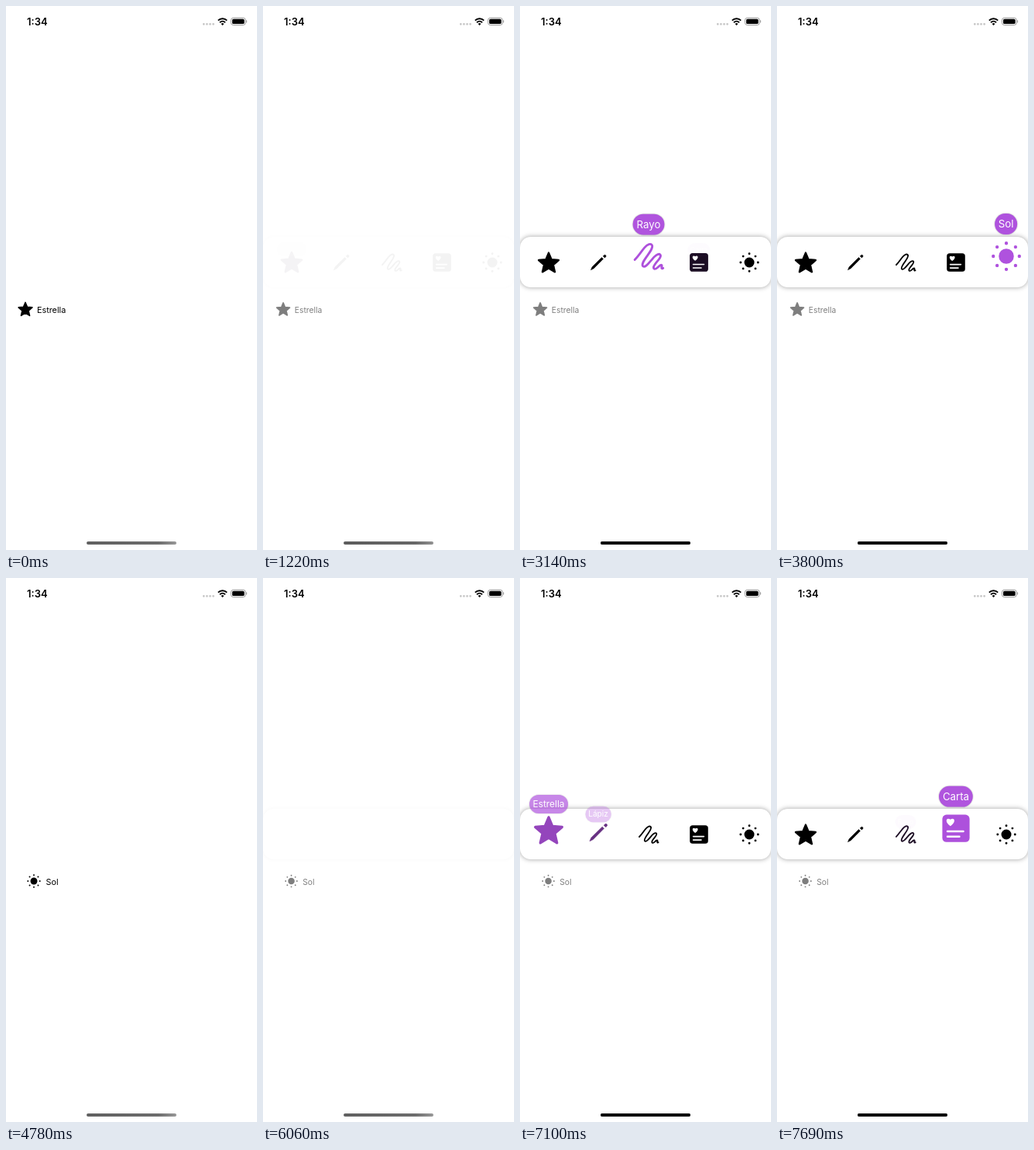
An HTML page that plays this animation: 324 by 700 pixels, repeating every 8000 ms.

```html
<!DOCTYPE html>
<html lang="es">
<head>
<meta charset="utf-8">
<title>Icon picker</title>
<style>
  html, body { margin: 0; width: 100%; height: 100%; overflow: hidden; background: #fff; }
  body { font-family: Inter, "Liberation Sans", sans-serif; color: #000; }
  #stage { position: relative; width: 324px; height: 700px; overflow: hidden; background: #fff; }
  #stage > * { position: absolute; }
  svg { display: block; overflow: visible; }
  #status { left: 0; top: 0; }
  .home { left: 104px; top: 688.7px; width: 116px; height: 4.3px; border-radius: 3px; }
  #homeGray { background: linear-gradient(90deg, #606060, #6c6c6c 80%, #989898); }
  #homeBlack { background: #000; }
  .label { top: 379px; height: 22px; display: flex; align-items: center; font-size: 10.8px; white-space: nowrap; }
  .label svg { width: 22px; height: 22px; margin-right: 4.5px; }
  .label span { position: relative; top: 1.5px; }
  #bar { left: 0; top: 0; width: 324px; height: 700px; }
  #panel { position: absolute; left: 0; top: 297px; width: 324px; height: 65px; border-radius: 14px;
    background: #fff; box-shadow: 0 0 6px rgba(0, 0, 0, .38); }
  .icon { position: absolute; top: 314px; width: 32px; height: 32px; margin-left: -16px; }
  .pill { position: absolute; top: 266.5px; height: 27px; line-height: 27px; padding: 0 5px; border-radius: 14px;
    background: #af52de; color: #fff; font-size: 13.3px; white-space: nowrap; box-shadow: 0 0 2px rgba(0, 0, 0, .35); }
</style>
</head>
<body>
<svg width="0" height="0" style="position:absolute">
  <symbol id="star" viewBox="-16 -16 32 32" overflow="visible">
    <path d="M0-12.4 3.6-3.8 12.9-3 5.9 3.1 8 12.2 0 7.4-8 12.2-5.9 3.1-12.9-3-3.6-3.8Z"
      fill="currentColor" stroke="currentColor" stroke-width="2.4" stroke-linejoin="round"/>
  </symbol>
  <symbol id="pencil" viewBox="-16 -16 32 32" overflow="visible">
    <path d="M-9.5 9.6-7.9 5.8 4.5-6.4 6.4-4.5-5.8 7.8ZM6.3-8.1 7.4-9.2Q8.6-10.2 9.6-9.2 10.5-8.2 9.6-7.1L8.4-6Z"
      fill="currentColor" stroke="currentColor" stroke-width=".6" stroke-linejoin="round"/>
  </symbol>
  <symbol id="scribble" viewBox="-16 -16 32 32" overflow="visible">
    <path d="M-12 3C-9 0-6.5-4-3.5-7.5-1-10.5 2-11.5 3-9.5 4-7.5 1-3.5-1.5 0-4 3.5-6.5 7-4.8 8.6-3 10 0 6 2.8 2.8 5 0 8.5-3 10-1.5 11.5 0 8.5 3 6.5 5.5 4.5 8 3.5 10 5 10.8 6.8 11.5 8.5 8.5 10.2 7.6 12 7 11.5 8.5 11.2 9.5 11 10.8 12 10.8 12.6 10.2"
      fill="none" stroke="currentColor" stroke-width="1.9" stroke-linecap="round"/>
  </symbol>
  <symbol id="card" viewBox="-16 -16 32 32" overflow="visible">
    <rect x="-11.8" y="-11.8" width="23.6" height="23.6" rx="3.6" fill="currentColor"/>
    <path d="M-4.8-2C-10.5-5.8-8-10-4.8-7.6-1.6-10 .9-5.8-4.8-2Z" fill="#fff"/>
    <path d="M-7.4 2.6H6.4M-7.4 7.1H3" stroke="#fff" stroke-width="1.6" stroke-linecap="round"/>
  </symbol>
  <symbol id="sun" viewBox="-16 -16 32 32" overflow="visible">
    <circle r="6.5" fill="currentColor"/>
    <circle r="11.2" fill="none" stroke="currentColor" stroke-width="2.9" stroke-linecap="round"
      pathLength="8" stroke-dasharray="0 1"/>
  </symbol>
</svg>

<div id="stage">
  <svg id="status" width="324" height="40">
    <text x="27" y="24.9" font-size="13" font-weight="600">1:34</text>
    <path d="M255.3 23.3h13.5" stroke="#c6c6c6" stroke-width="2.8" stroke-linecap="round" stroke-dasharray="0 4.1"/>
    <g fill="none" stroke="#000" stroke-width="2">
      <path d="M273.8 18.6a8.2 8.2 0 0 1 11.4 0"/>
      <path d="M276 21.2a5 5 0 0 1 7 0"/>
    </g>
    <path d="M279.5 25 277.6 23a2.7 2.7 0 0 1 3.8 0Z"/>
    <rect x="290.5" y="15.3" width="18.6" height="9.2" rx="2.8" fill="none" stroke="#999"/>
    <rect x="292" y="16.8" width="15.6" height="6.2" rx="1.6"/>
    <path d="M310.2 18.3q1.4 1.6 0 3.2Z" fill="#999" stroke="#999" stroke-width=".5"/>
  </svg>
  <div class="label" id="before" style="left:13.5px;transform-origin:33.5px 11.5px">
    <svg><use href="#star"/></svg><span>Estrella</span>
  </div>
  <div class="label" id="after" style="left:25px;transform-origin:22px 11.5px">
    <svg><use href="#sun"/></svg><span>Sol</span>
  </div>
  <div id="bar"><div id="panel"></div></div>
  <div class="home" id="homeGray"></div>
  <div class="home" id="homeBlack"></div>
</div>

<script>
const LOOP = 8000;
const $ = id => document.getElementById(id);
const names = [['star', 'Estrella'], ['pencil', 'Lápiz'], ['scribble', 'Rayo'], ['card', 'Carta'], ['sun', 'Sol']];

// [time, selected item], -1 for none
const picks = [[1200, 0], [1908, 1], [2548, 2], [3128, 3], [3628, 4], [5000, -1],
               [6550, 0], [7038, 1], [7285, 2], [7535, 3]];

const ease = x => {
  x = Math.min(1, Math.max(0, x));
  return x * x * (3 - 2 * x);
};
const ramp = (t, start, dur = 170) => ease((t - start) / dur);

// Springy entrance that overshoots to about 1.2
const pop = u => u <= 0 ? 0 : 1 - Math.exp(-.0107 * u) * Math.cos(.02094 * u);

// Purple blended from black in linear light
const tint = p => {
  const k = p ** (1 / 2.2);
  return `rgb(${175 * k}, ${82 * k}, ${222 * k})`;
};

const items = names.map(([id, title], i) => {
  const x = 36.5 + 64.75 * i;
  $('bar').insertAdjacentHTML('beforeend',
    `<svg class="icon" style="left:${x}px"><use href="#${id}"/></svg>`);
  return { icon: $('bar').lastElementChild, title, x };
});
for (const it of items) {
  $('bar').insertAdjacentHTML('beforeend', `<div class="pill" style="left:${it.x}px">${it.title}</div>`);
  it.pill = $('bar').lastElementChild;
}

function selection(i, t) {
  let p = 0, prev = -1;
  for (const [start, pick] of picks) {
    if (pick === i) p += ramp(t, start);
    if (prev === i) p -= ramp(t, start);
    prev = pick;
  }
  return Math.max(0, p);
}

function setLabel(el, press, show) {
  el.style.opacity = show * (1 - .5 * press);
  el.style.transform = `scale(${1 - .05 * press})`;
}

function draw(now) {
  const t = now % LOOP;
  const close = ramp(t, 4550, 220);

  setLabel($('before'), ramp(t, 25, 80) - close, 1 - close);
  setLabel($('after'), 1 - close + ramp(t, 5725, 80), close);
  $('bar').style.opacity = ramp(t, 1200) - close + ramp(t, 6030);
  $('homeBlack').style.opacity = ramp(t, 1200) - close + ramp(t, 6490);

  items.forEach(({ icon, pill }, i) => {
    const p = selection(i, t);
    const entry = t < 5000 ? 1 : pop(t - 6080 - 60 * i);
    icon.style.transform = `translateY(${-8 * p}px) scale(${(1 + .5 * p) * entry})`;
    icon.style.color = tint(p);
    pill.style.opacity = p;
    pill.style.transform = `translate(-50%, ${34 * (1 - p)}px) scale(${.65 + .35 * p})`;
  });
}

function tick() {
  draw(performance.now());
  requestAnimationFrame(tick);
}
tick();
</script>
</body>
</html>
```
